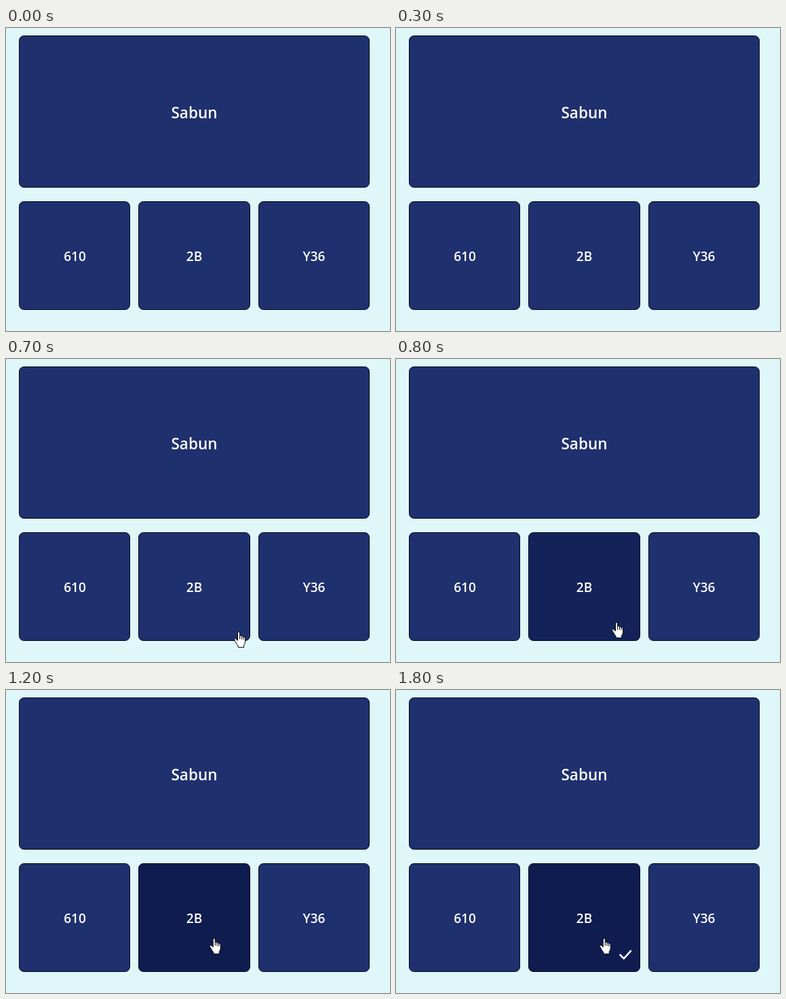
An HTML page that plays this animation: 566x446 px, repeating every 3000 ms.

```html
<!DOCTYPE html>
<html lang="en">
<head>
<meta charset="utf-8">
<title>Answer tiles</title>
<style>
  html, body { margin: 0; width: 100%; height: 100%; overflow: hidden; background: #e0f7fa; }
  svg { display: block; width: 566px; height: 446px; }
  .card { fill: #1f306e; stroke: #04081c; }
  text { fill: #fff; font: 600 19px "Open Sans", "Noto Sans", sans-serif; text-anchor: middle; }
  .title { font-size: 22.5px; }
  .cursor { fill: #fff; stroke: #000; stroke-linejoin: round; stroke-linecap: round; visibility: hidden; }
</style>
</head>
<body>
<svg viewBox="0 0 566 446">
  <rect class="card" x="19.5" y="11.5" width="516" height="223" rx="7"/>
  <rect class="card" x="19.5" y="255.5" width="163" height="159" rx="7"/>
  <rect class="card" id="pick" x="195.5" y="255.5" width="164" height="159" rx="7"/>
  <rect class="card" x="372.5" y="255.5" width="163" height="159" rx="7"/>
  <text class="title" x="277.5" y="133">Sabun</text>
  <text x="101.5" y="343">610</text>
  <text x="277.5" y="343">2B</text>
  <text x="454" y="343">Y36</text>
  <path id="check" d="M330.5 390l5.3 5.4L346 384.2" fill="none" stroke="#fff"
        stroke-width="2.6" stroke-linecap="round" stroke-linejoin="round"/>
  <path id="arrow" class="cursor" d="M.5 .5V16.5L4.2 13L6.7 18.6L9 17.6L6.6 12.2H11.8Z"/>
  <path id="hand" class="cursor" d="M5.5 13V2.2Q5.5 .6 7 .6T8.6 2.2V6.6Q8.9 5.8 10 5.8Q11.3 5.8 11.4 7.4
    Q11.7 6.8 12.6 6.8Q13.9 6.8 14 8.5Q14.3 8 15.1 8Q16.5 8.1 16.5 9.8V15.5Q16.5 18 14.6 20.2V23.4H6.2V21.2
    Q3.6 18.4 2.6 15.8L.7 12.8Q.2 11.4 1.3 10.8Q2.6 10.4 3.7 11.7ZM8.6 6.6V11M11.4 7.4V11.3M14 8.5V11.6"/>
</svg>
<script>
const LOOP = 3000;
const get = id => document.getElementById(id);
const pick = get("pick"), check = get("check");
const cursors = { arrow: get("arrow"), hand: get("hand") };

// [start ms, cursor, x, y, tile shade, tick opacity]
const steps = [
  [0, "", 0, 0, 0, 0],
  [500, "arrow", 388, 443, 0, 0],
  [600, "arrow", 365, 424, 0, 0],
  [700, "hand", 336, 401, 0, 0],
  [800, "hand", 318, 387, 0.7, 0],
  [900, "hand", 311.5, 378.5, 0.96, 0],
  [1000, "hand", 307, 372.5, 1, 0],
  [1100, "hand", 302, 367.5, 1, 0],
  [1200, "hand", 299.7, 365, 1, 0],
  [1600, "hand", 299.7, 365, 1, 0.35],
  [1700, "hand", 299.7, 365, 1, 0.8],
  [1800, "hand", 299.7, 365, 1, 1]
];

const rest = [31, 48, 110], hover = [14, 28, 80];
const mix = k => `rgb(${rest.map((c, i) => Math.round(c + (hover[i] - c) * k))})`;

function draw(t) {
  const [, kind, x, y, shade, tick] = steps.filter(s => s[0] <= t).pop();
  for (const name in cursors) {
    cursors[name].style.visibility = name === kind ? "visible" : "hidden";
    cursors[name].setAttribute("transform", `translate(${x} ${y})`);
  }
  pick.style.fill = mix(shade);
  check.style.opacity = tick;
}

const start = performance.now();
function loop() {
  draw((performance.now() - start) % LOOP);
  requestAnimationFrame(loop);
}
loop();
</script>
</body>
</html>
```
